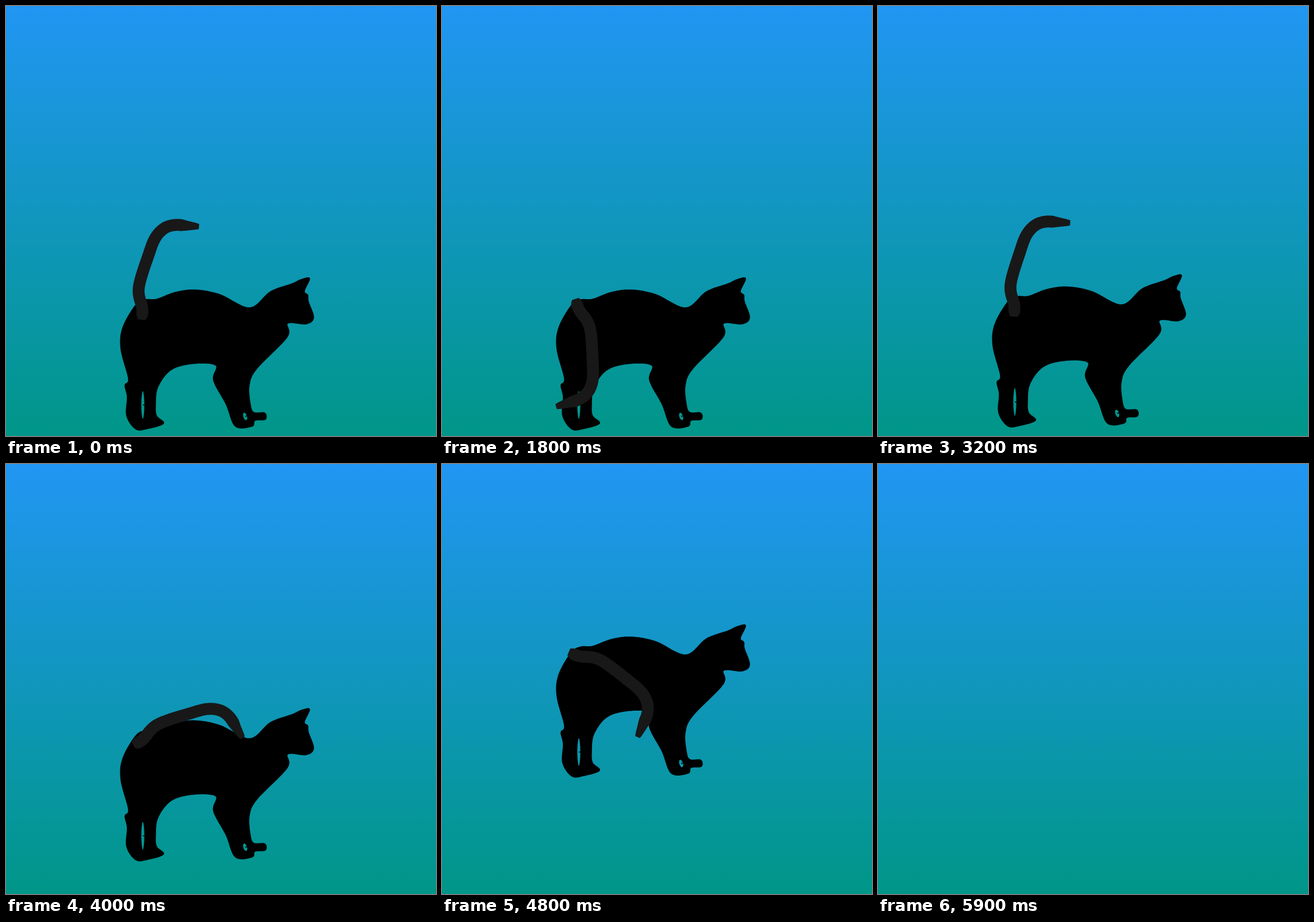
These frames come from a looping animation (748 px wide and 748 px high, 6000 ms). An HTML page with a canvas:

```html
<!DOCTYPE html>
<html lang="en">
<head>
<meta charset="utf-8">
<title>Cat lift-off</title>
<style>
  html, body { margin: 0; width: 100%; height: 100%; overflow: hidden; background: #0f96bd; }
  canvas { display: block; width: 100vw; height: 100vh; }
</style>
</head>
<body>
<canvas id="stage" width="748" height="748"></canvas>
<script>
const SIZE = 748, LOOP = 6000, STEP = 100;
const SPIN_START = 1900, LIFT_START = 2100;
const PIVOT = { x: 237.5, y: 527.3 };
const ctx = document.getElementById('stage').getContext('2d');

// Key points, clockwise around the silhouette.
const back = [225,521, 242,511, 262,510, 295,498, 330,494, 372,502, 424,525, 460,497, 498,483];
const head = [513,476, 528,474, 519,496, 525,503, 526,514, 535,542, 522,553, 490,552];
const chest = [489,576, 436,631, 423,660];
const foreleg = [425,693, 431,707, 450,708, 451,719, 433,721, 428,731, 399,731, 383,693, 361,651, 365,625];
const belly = [325,622, 287,633, 264,663];
const hindleg = [260,695, 262,713, 274,726, 247,735, 226,736, 210,713, 211,680, 207,660, 213,648, 200,597, 203,560];
const spine = [236,545, 237,526, 231,490, 249,430, 260,403, 275,387, 293,381, 314,382, 335,383.5];

// Catmull-Rom position between p1 and p2.
const blend = (p0, p1, p2, p3, f) => p1 + f / 2 * (p2 - p0 +
  f * (2 * p0 - 5 * p1 + 4 * p2 - p3 + f * (3 * (p1 - p2) + p3 - p0)));

function sample(pts, pos, closed) {
  const n = pts.length / 2, i = Math.floor(pos);
  const wrap = k => closed ? (k + n) % n : Math.max(0, Math.min(n - 1, k));
  const axis = a => blend(...[-1, 0, 1, 2].map(d => pts[wrap(i + d) * 2 + a]), pos - i);
  return [axis(0), axis(1)];
}

function polygon(points) {
  const path = new Path2D();
  points.forEach(p => path.lineTo(...p));
  path.closePath();
  return path;
}

function makeBody() {
  const pts = [back, head, chest, foreleg, belly, hindleg].flat();
  const edge = [];
  for (let pos = 0; pos < pts.length / 2; pos += 0.1) edge.push(sample(pts, pos, true));
  const path = polygon(edge);
  const gap = (x, y, rx, ry, tilt) => {
    path.moveTo(x, y);
    path.ellipse(x, y, rx, ry, tilt, 0, 2 * Math.PI);
  };
  gap(238, 694, 3.4, 25, 0);
  gap(416, 714, 4, 7.5, -0.3);
  return path;
}

// A ribbon along the spine, narrowed at both ends.
function makeTail() {
  const left = [], right = [], last = spine.length / 2 - 1;
  for (let k = 0; k <= 80; k++) {
    const u = k / 80, pos = u * last;
    const [x, y] = sample(spine, pos);
    const [ax, ay] = sample(spine, Math.max(0, pos - 0.05));
    const [bx, by] = sample(spine, Math.min(last, pos + 0.05));
    const half = 9.6 * Math.min(1, 0.6 + 6 * u, 0.4 + 3.4 * (1 - u));
    const s = half / Math.hypot(bx - ax, by - ay);
    const nx = (by - ay) * s, ny = (ax - bx) * s;
    left.push([x + nx, y + ny]);
    right.unshift([x - nx, y - ny]);
  }
  return polygon(left.concat(right));
}

const body = makeBody(), tail = makeTail();
const sky = ctx.createLinearGradient(0, 0, 0, SIZE);
sky.addColorStop(0, '#2196f3');
sky.addColorStop(1, '#009688');

// The tail winds up slowly, then spins at a steady rate.
const tailAngle = t => t < SPIN_START
  ? -250 * (t / SPIN_START) ** 4
  : -0.8312 * (t - SPIN_START);

const lift = t => 840 * (Math.max(0, t - LIFT_START) / (LOOP - LIFT_START)) ** 4;

function paint(path, color) {
  ctx.fillStyle = ctx.strokeStyle = color;
  ctx.fill(path, 'evenodd');
  ctx.stroke(path);
}

function draw(t) {
  ctx.fillStyle = sky;
  ctx.fillRect(0, 0, SIZE, SIZE);
  ctx.save();
  ctx.lineWidth = 1.5;
  ctx.lineJoin = 'round';
  ctx.translate(0, -lift(t));
  paint(body, '#000');
  ctx.translate(PIVOT.x, PIVOT.y);
  ctx.rotate(tailAngle(t) * Math.PI / 180);
  ctx.translate(-PIVOT.x, -PIVOT.y);
  paint(tail, '#181818');
  ctx.restore();
}

function tick() {
  draw(Math.floor(performance.now() % LOOP / STEP) * STEP);
  requestAnimationFrame(tick);
}
tick();
</script>
</body>
</html>
```
